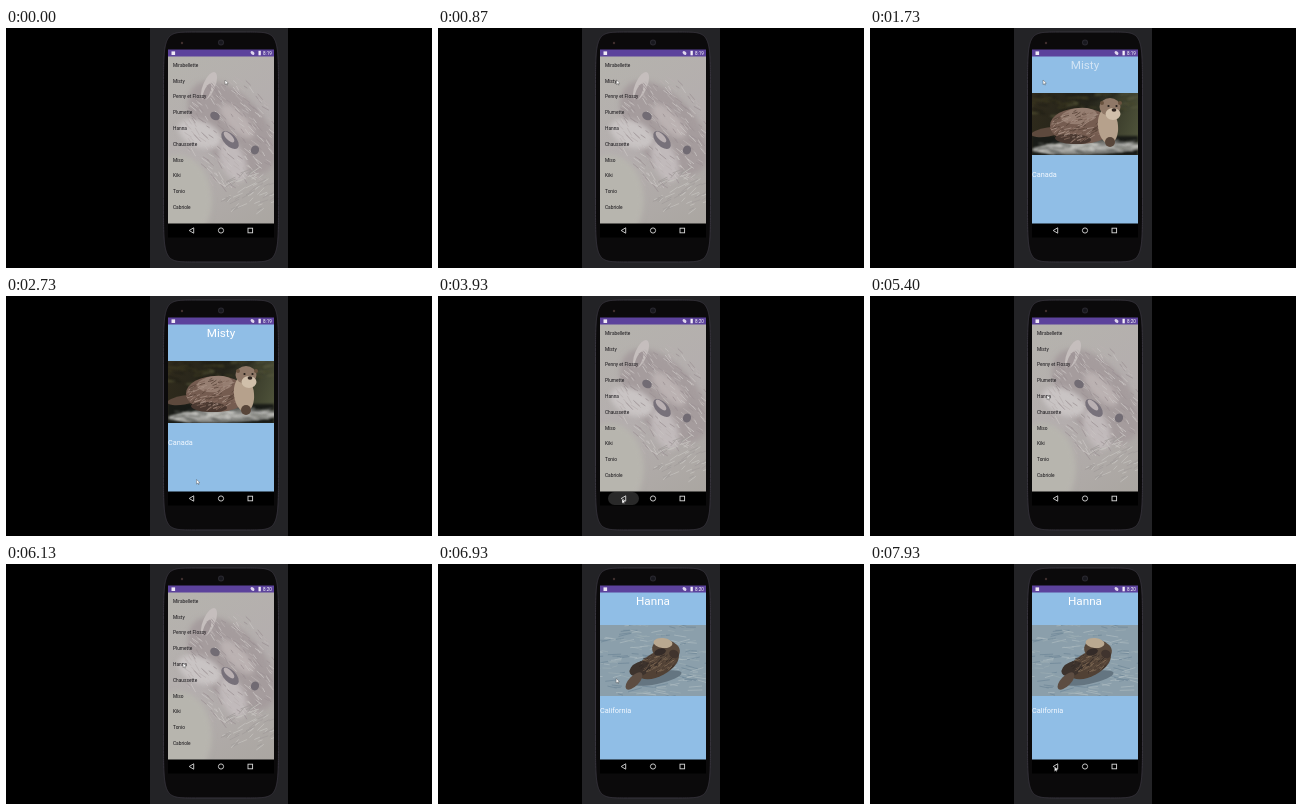
These frames come from a looping animation (426 px wide and 240 px high, 8000 ms). An HTML page with a canvas:

```html
<!DOCTYPE html>
<html lang="fr">
<head>
<meta charset="utf-8">
<title>Otter list</title>
<style>
html, body { margin: 0; width: 100%; height: 100%; overflow: hidden; background: #000; }
canvas { display: block; width: 100%; height: 100%; }
</style>
</head>
<body>
<canvas id="stage"></canvas>
<script>
const W = 426, H = 240, LOOP = 8000;
const left = 162, top_ = 28, wide = 106, tall = 168, middle = 215;
const canvas = document.getElementById('stage');
const ratio = window.devicePixelRatio || 1;
canvas.width = W * ratio;
canvas.height = H * ratio;
const c = canvas.getContext('2d');
c.scale(ratio, ratio);

const names = ['Mirabellette', 'Misty', 'Penny et Flossy', 'Plumette', 'Hanna',
  'Chaussette', 'Miso', 'Kiki', 'Tonio', 'Cabriole'];

const moves = [
  { start: 400, time: 600, x: 173, y: 52 },
  { start: 1850, time: 880, x: 190.5, y: 183.5 },
  { start: 2850, time: 450, x: 184, y: 203 },
  { start: 4150, time: 1200, x: 177, y: 99 },
  { start: 6700, time: 950, x: 184.5, y: 203 }
];

const phase = (t, start, time) => Math.max(0, Math.min(1, (t - start) / time));
const ease = (t, start, time) => {
  const v = phase(t, start, time);
  return v * v * (3 - 2 * v);
};

function seeded(seed) {
  return () => (seed = (seed * 16807) % 2147483647) / 2147483647;
}

function rect(color, x, y, w, h) {
  c.fillStyle = color;
  c.fillRect(x, y, w, h);
}

function oval(color, x, y, rx, ry = rx, turn = 0) {
  c.beginPath();
  c.ellipse(x, y, rx, ry, turn, 0, Math.PI * 2);
  c.fillStyle = color;
  c.fill();
}

function polygon(points) {
  c.beginPath();
  points.forEach(p => c.lineTo(...p));
  c.closePath();
}

function gradient(x0, y0, x1, y1, ...colors) {
  const g = c.createLinearGradient(x0, y0, x1, y1);
  colors.forEach((color, i) => g.addColorStop(i / (colors.length - 1), color));
  return g;
}

function text(str, x, y, size, color, align = 'left') {
  c.font = `${size}px Roboto, sans-serif`;
  c.textAlign = align;
  c.fillStyle = color;
  c.fillText(str, x, y);
}

function soften(size, draw) {
  c.filter = `blur(${size * ratio}px)`;
  draw();
  c.filter = 'none';
}

// Short strokes scattered evenly inside an ellipse
function streaks(colors, count, x, y, rx, ry, length, turn = 0) {
  const random = seeded(count * 97 + 11);
  c.lineWidth = 0.8;
  for (let i = 0; i < count; i++) {
    const a = random() * Math.PI * 2, r = Math.sqrt(random());
    const px = x + rx * r * Math.cos(a), py = y + ry * r * Math.sin(a);
    const dir = turn + (random() - 0.5) * 0.6, l = length * (0.5 + random());
    c.strokeStyle = colors[i % colors.length];
    c.beginPath();
    c.moveTo(px, py);
    c.lineTo(px + l * Math.cos(dir), py + l * Math.sin(dir));
    c.stroke();
  }
}

function phone() {
  rect('#000', 0, 0, W, H);
  rect('#232326', 144, 0, 138, H);
  // Superellipse body
  const bend = v => Math.sign(v) * Math.abs(v) ** 0.2;
  polygon(Array.from({ length: 360 }, (_, i) => {
    const a = i * Math.PI / 180;
    return [middle + 57.5 * bend(Math.cos(a)), 119 + 115 * bend(Math.sin(a))];
  }));
  c.fillStyle = '#0b0a0b';
  c.fill();
  c.strokeStyle = '#37343d';
  c.lineWidth = 1;
  c.stroke();
  oval('#2a2930', middle, 14.5, 3);
  oval('#18181e', middle, 14.5, 2);
  oval('#40302f', 176, 15, 1.2);
}

function statusBar(t) {
  rect('#5c429c', left, 21.5, wide, 7);
  rect('#eee8f5', 165.5, 23.4, 3.6, 3.6);
  oval('#ded5ed', 246.5, 25, 2.2, 1.5, 0.7);
  rect('#f3eef8', 252.5, 22.8, 2.3, 4.5);
  text(t < 3200 ? '8:19' : '8:20', 257, 27, 4.6, '#fff');
}

function navBar(press) {
  rect('#000', left, 195.5, wide, 14);
  c.globalAlpha = press;
  c.beginPath();
  c.roundRect(170, 196, 31, 13, 6.5);
  c.fillStyle = '#292929';
  c.fill();
  c.globalAlpha = 1;
  c.strokeStyle = '#d9d9d9';
  c.lineWidth = 0.9;
  polygon([[187.7, 199.8], [183.2, 202.5], [187.7, 205.2]]);
  c.stroke();
  c.beginPath();
  c.arc(middle, 202.5, 2.6, 0, Math.PI * 2);
  c.stroke();
  c.strokeRect(242, 200.2, 4.6, 4.6);
}

function fadedFace() {
  rect(gradient(162, 28, 268, 196, '#b5b3ad', '#b4aeae', '#aaa6a1'), left, top_, wide, tall);
  soften(2.5, () => {
    oval('#a59c9d', 226, 100, 56, 32, 0.85);
    oval('#b7b5ae', 172, 172, 34, 45);
    oval('#c9c4c4', 194, 106, 23, 13, 0.4);
    oval('#c1babb', 227, 133, 12, 22, -0.4);
    oval('#bbb2b2', 231, 93, 22, 9, 0.8);
  });
  soften(0.6, () => {
    oval('#c5bebd', 203, 58, 6, 15, 0.4);
    oval('#a2989a', 201, 64, 3, 9, 0.4);
    streaks(['#c8c3c2', '#9d9496', '#b9b2b1'], 240, 222, 102, 45, 55, 7, 0.8);
    streaks(['#c5c2be', '#a29d9c'], 60, 240, 168, 26, 24, 8, -0.6);
    oval('#726c74', 209, 88, 5, 4, 0.5);
    oval('#716b73', 249, 122, 4, 4.5, 0.5);
    oval('#77717a', 224, 112, 11, 6, 0.8);
    oval('#b9b0b2', 223, 109, 7, 3, 0.8);
  });
}

function listPage() {
  fadedFace();
  names.forEach((name, i) => text(name, 167, 38.8 + i * 15.8, 4.8, '#151317'));
}

function riverOtter() {
  rect(gradient(162, 65, 268, 100, '#302b1c', '#24231a', '#4d5139'), left, 65, wide, 62);
  soften(1, () => {
    streaks(['#4c4927', '#171712', '#626343'], 70, 205, 76, 62, 16, 9);
    rect('#191b17', left, 108, wide, 20);
    oval('#a9a9a5', 218, 120, 56, 6, -0.03);
    streaks(['#dcdcd7', '#3c3e3b', '#777872'], 70, 215, 119, 55, 8, 11);
  });
  soften(0.5, () => {
    oval('#5d493d', 178, 104, 17, 4.5, -0.15);
    oval('#755c50', 211, 98, 31, 18, 0.02);
    oval('#967e71', 209, 88, 18, 8, -0.1);
    oval('#493830', 203, 111, 18, 5, 0.05);
    streaks(['#a89185', '#594439', '#846a5d'], 130, 210, 97, 27, 15, 5, 2.7);
    oval('#b6a18c', 238, 98, 10, 18, -0.1);
    oval('#58463a', 240, 114, 5, 5);
    oval('#8f7867', 240, 79, 10.5, 9);
    oval('#d0bfaa', 243, 86, 7.5, 6);
    for (const side of [-1, 1]) {
      oval('#69533f', 241 + side * 9, 75, 2);
      oval('#241f1a', 242.5 + side * 4, 78, 1.1);
    }
    oval('#30251f', 244, 82, 2.4, 1.7);
  });
}

function seaOtter() {
  rect('#8b9fab', left, 61, wide, 71);
  soften(0.5, () => {
    streaks(['#a9b8be', '#71899a', '#9aabb3'], 170, 211, 96, 60, 40, 10);
    oval('#647581', 218, 114, 26, 6, -0.2);
    oval('#514135', 220, 100, 23, 12, -0.5);
    oval('#3d332d', 202, 105, 11, 7, -0.4);
    oval('#5d4d42', 196, 117, 11, 5, -0.8);
    oval('#58483b', 228, 86, 14, 10, 0.2);
    streaks(['#806b56', '#342b27', '#665344'], 90, 217, 101, 17, 9, 4, -0.6);
    oval('#baa991', 225, 79, 9.5, 5, 0.1);
    oval('#342b28', 222, 88, 6, 3.5, -0.3);
    oval('#40342e', 236, 90, 5, 4, 0.4);
  });
}

function detailPage(name, place, y, height, picture, glow = 1) {
  rect('#90bee6', left, top_, wide, tall);
  text(name, middle, 41.2, 11.7, `rgba(255,255,255,${glow})`, 'center');
  c.save();
  c.beginPath();
  c.rect(left, y, wide, height);
  c.clip();
  picture();
  c.restore();
  text(place, left, 148.6, 7.3, '#f4f9ff');
}

// Page fades in while settling upwards
function overlay(amount, draw) {
  if (!amount) return;
  c.globalAlpha = amount;
  c.translate(0, 12 * (1 - amount));
  draw();
}

function screen(draw) {
  c.save();
  c.beginPath();
  c.rect(left, top_, wide, tall);
  c.clip();
  draw();
  c.restore();
}

function pointer(t) {
  let x = 219, y = 52;
  for (const m of moves) {
    const k = ease(t, m.start, m.time);
    x += (m.x - x) * k;
    y += (m.y - y) * k;
  }
  c.save();
  c.translate(x, y);
  polygon([[0, 0], [0, 4.6], [1.2, 3.6], [2.2, 5.2], [2.2, 3.2], [3.3, 3.1]]);
  c.fillStyle = '#fff';
  c.fill();
  c.strokeStyle = '#333';
  c.lineWidth = 0.35;
  c.stroke();
  c.restore();
}

function draw(t) {
  const first = ease(t, 1450, 200) - ease(t, 3560, 200);
  const second = ease(t, 6450, 200);
  phone();
  if (first < 1 && second < 1) screen(listPage);
  screen(() => overlay(first, () => detailPage('Misty', 'Canada', 65, 62, riverOtter,
    0.6 + 0.4 * phase(t, 1730, 270))));
  screen(() => overlay(second, () => detailPage('Hanna', 'California', 61, 71, seaOtter)));
  statusBar(t);
  navBar(phase(t, 3480, 120) - phase(t, 3960, 200));
  pointer(t);
}

function tick(now) {
  draw(now % LOOP);
  requestAnimationFrame(tick);
}
requestAnimationFrame(tick);
</script>
</body>
</html>
```
